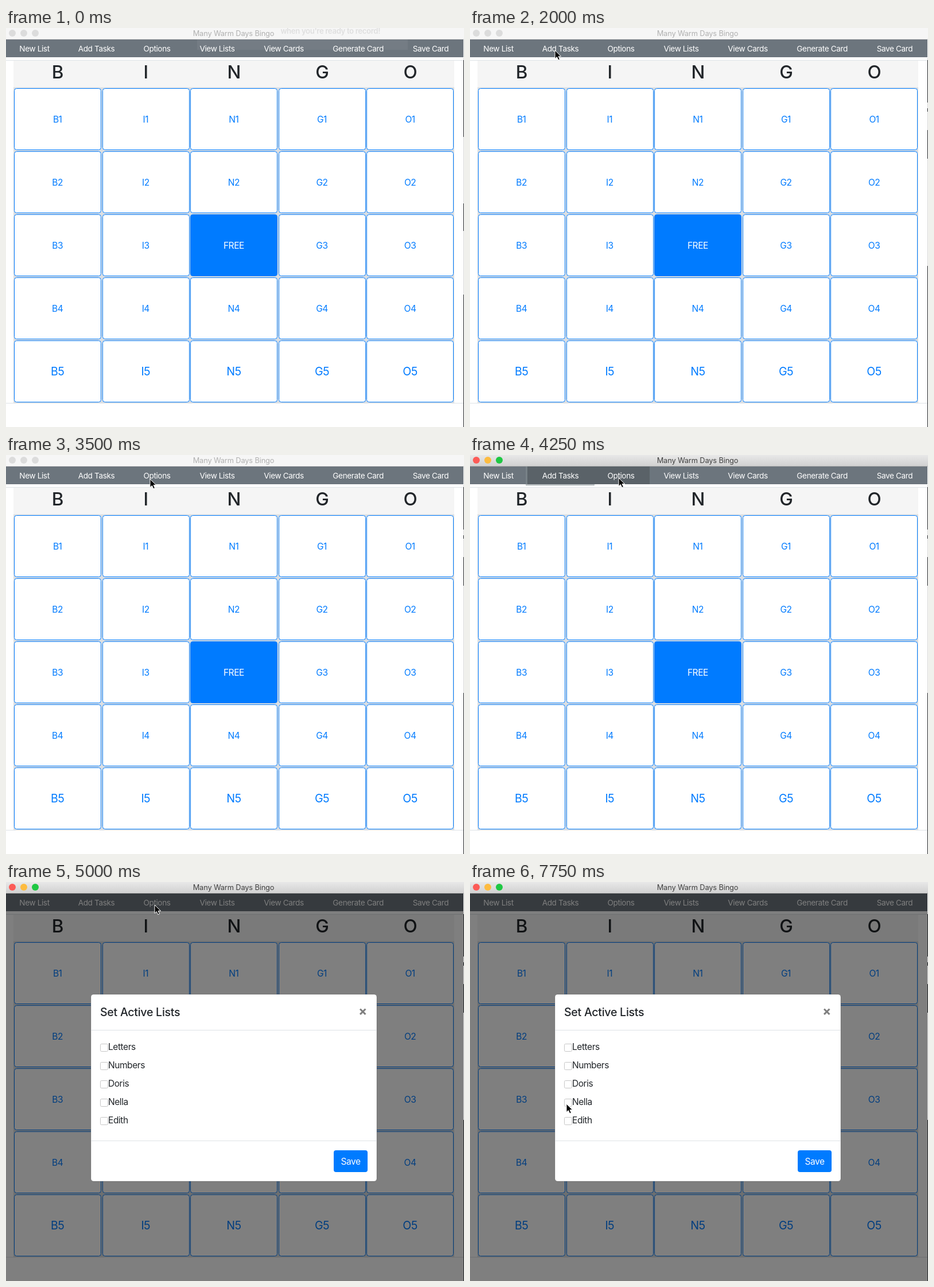
Recreate the animation shown at these times as an HTML page. Size 798 by 696 pixels, loop 8 s.

```html
<!DOCTYPE html>
<html lang="en">
<head>
<meta charset="utf-8">
<title>Bingo</title>
<style>
  html, body { margin: 0; width: 100%; height: 100%; overflow: hidden; background: #fff; }
  svg { display: block; width: 100%; height: 100%; }
  text { font-family: Inter, Roboto, "Liberation Sans", sans-serif; letter-spacing: -.028em; }
</style>
</head>
<body>
<svg id="stage" viewBox="0 0 798 696">
  <defs>
    <linearGradient id="chrome" x1="0" y1="0" x2="0" y2="1">
      <stop offset="0" stop-color="#e8e8e8"/>
      <stop offset="1" stop-color="#d0d0d0"/>
    </linearGradient>
  </defs>
</svg>
<script>
const LOOP = 8000, STEP = 250;
const BLUE = '#007bff', INK = '#212529', NAV = '#6c757d', HOVER = '#5a6268', RULE = '#dee2e6';
const stage = document.getElementById('stage');

function el(tag, attrs, parent = stage) {
  const node = document.createElementNS('http://www.w3.org/2000/svg', tag);
  for (const key in attrs) node.setAttribute(key, attrs[key]);
  return parent.appendChild(node);
}
const group = (parent) => el('g', {}, parent);
const rect = (x, y, width, height, fill, parent, more) =>
  el('rect', { x, y, width, height, fill, ...more }, parent);
function label(str, x, y, size, fill, parent, more) {
  const node = el('text', { x, y, 'font-size': size, fill, ...more }, parent);
  node.textContent = str;
  return node;
}
const mid = { 'text-anchor': 'middle' };
const show = (node, on) => node.setAttribute('display', on ? 'inline' : 'none');

// Page and bingo card
const page = group();
rect(0, 0, 798, 696, '#fff', page);
rect(0, 56, 797, 1, RULE, page);
rect(13, 57, 768, 47, '#f5f5f5', page);
rect(13, 103.5, 768, 551, '#dcdfe2', page);
rect(0, 654, 797, 1, RULE, page);
[...'BINGO'].forEach((letter, col) => {
  const cx = 89.7 + col * 153.6;
  label(letter, cx, 88, 31.5, INK, page, { ...mid, 'font-weight': 500 });
  for (let row = 0; row < 5; row++) {
    const free = col === 2 && row === 2;
    rect(Math.round(14 + col * 153.6) + .5, 105.5 + row * 110, 151, 107,
      free ? BLUE : '#fff', page, { stroke: BLUE, rx: 4 });
    const last = row === 4;
    label(free ? 'FREE' : letter + (row + 1), cx, (last ? 606 : 165) + (last ? 0 : row * 110),
      last ? 19.6 : 15.5, free ? '#fff' : BLUE, page, mid);
  }
});

// Strips of desktop seen past the window's right edge
function edge(spans) {
  const g = group(page);
  rect(797, 52, 1, 644, '#d8d8d8', g);
  spans.forEach(([y, h]) => rect(797, y, 1, h, '#26282b', g));
  return g;
}
const edgeEarly = edge([[56, 134], [306, 48], [465, 231]]);
const edgeLate = edge([[56, 74], [140, 6], [178, 50], [415, 281]]);

// Navigation bar
rect(0, 20, 797, 31, NAV, page);
function navButton(x, width) {
  const g = group(page);
  const ring = rect(x - 3, 20, width + 6, 33.5, '#828a91', g, { 'fill-opacity': .55 });
  rect(x, 20, width, 31, HOVER, g);
  return { g, ring };
}
const addTasks = navButton(100, 114);
const options = navButton(213, 100);
[['New List', 49.5], ['Add Tasks', 157.5], ['Options', 263], ['View Lists', 368],
 ['View Cards', 484], ['Generate Card', 613.7], ['Save Card', 740]]
  .forEach(([str, x]) => label(str, x, 41, 13.6, '#fff', page, mid));

const backdrop = rect(0, 20, 797, 676, '#000', stage, { 'fill-opacity': .5 });

// Title bar
function titleBar(fill, ink, lights, rim) {
  const g = group();
  rect(0, 0, 798, 20, fill, g);
  rect(0, 19, 798, 1, rim, g);
  lights.forEach((c, i) => el('circle', { cx: 11 + i * 20, cy: 9, r: 6, fill: c }, g));
  label('Many Warm Days Bingo', 396.5, 14, 12.8, ink, g, { ...mid, style: 'letter-spacing:-.01em' });
  return g;
}
const barIdle = titleBar('#f6f6f6', '#b0b0b0', Array(3).fill('#dcdcdc'), '#dedede');
const barLive = titleBar('url(#chrome)', '#404040', ['#fc5b57', '#fdbc40', '#1fc843'], '#b8b8b8');

// Fading hint bubble
const hint = group();
rect(333, 20, 367, 18, '#fff', hint, { 'fill-opacity': .05 });
label("when you're ready to record!", 652, 10, 13.2, '#dfdfdf', hint,
  { 'text-anchor': 'end', 'font-weight': 600 });

// Dialog
const dialog = group();
rect(148, 196, 498, 326, '#fff', dialog, { rx: 4.5, stroke: '#000', 'stroke-opacity': .2 });
label('Set Active Lists', 164, 234, 19.6, INK, dialog, { 'font-weight': 500, style: 'letter-spacing:-.015em' });
el('path', { d: 'M617 221.5l9.4 9.4m0-9.4l-9.4 9.4', stroke: '#7f7f7f', 'stroke-width': 3 }, dialog);
rect(148, 258, 498, 1, RULE, dialog);
rect(148, 451, 498, 1, RULE, dialog);
['Letters', 'Numbers', 'Doris', 'Nella', 'Edith'].forEach((str, i) => {
  const y = 293 + i * 32;
  rect(164.5, y - 10.5, 13, 13, '#fff', dialog, { rx: 2, stroke: '#c6c6c6' });
  label(str, 178, y, 15.5, INK, dialog);
});
rect(571, 468, 59, 38, BLUE, dialog, { rx: 4 });
label('Save', 600.5, 493, 15.5, '#fff', dialog, mid);

const pointer = el('path', {
  d: 'M0 0V14.5L3.4 11.4 5.8 16.8 8.4 15.7 6 10.4H10.6Z',
  fill: '#000', stroke: '#fff', 'stroke-width': 1
});

// Pointer stops: time, x, y
const path = [
  [250, 480, 30], [500, 330, 90], [750, 210, 84], [1000, 152, 60], [1500, 151, 52],
  [2000, 148, 39], [2500, 146, 40], [2750, 152, 41], [3500, 251, 42], [3750, 259, 40],
  [5500, 259, 40], [6000, 240, 158], [6500, 210, 302], [6750, 192, 354],
  [7000, 180, 380], [7750, 168, 387], [8000, 168, 387]
];
function pointerAt(t) {
  const i = Math.max(1, path.findIndex(p => p[0] >= t));
  const [t0, x0, y0] = path[i - 1], [t1, x1, y1] = path[i];
  const k = (t - t0) / (t1 - t0);
  return [x0 + (x1 - x0) * k, y0 + (y1 - y0) * k];
}

function draw(ms) {
  const t = Math.floor(ms % LOOP / STEP) * STEP;
  const live = t >= 3750;
  show(barIdle, !live);
  show(barLive, live);
  show(edgeEarly, t < 1500);
  show(edgeLate, t >= 1500);
  hint.setAttribute('opacity', Math.max(0, 1 - t / 1000));

  show(addTasks.g, live && t < 4500);
  show(options.g, t >= 4250 && t < 4750);
  show(options.ring, t >= 4500);
  show(backdrop, t >= 4500);

  const enter = Math.min(1, Math.max(0, (t - 4500) / 300));
  const ease = 1 - (1 - enter) ** 2;
  show(dialog, enter > 0);
  dialog.setAttribute('opacity', ease);
  dialog.setAttribute('transform', `translate(0 ${-50 * (1 - ease)})`);

  show(pointer, t >= 250);
  if (t >= 250) pointer.setAttribute('transform', `translate(${pointerAt(t).join(' ')})`);
}

const start = performance.now();
function tick() {
  draw(performance.now() - start);
  requestAnimationFrame(tick);
}
tick();
</script>
</body>
</html>
```
